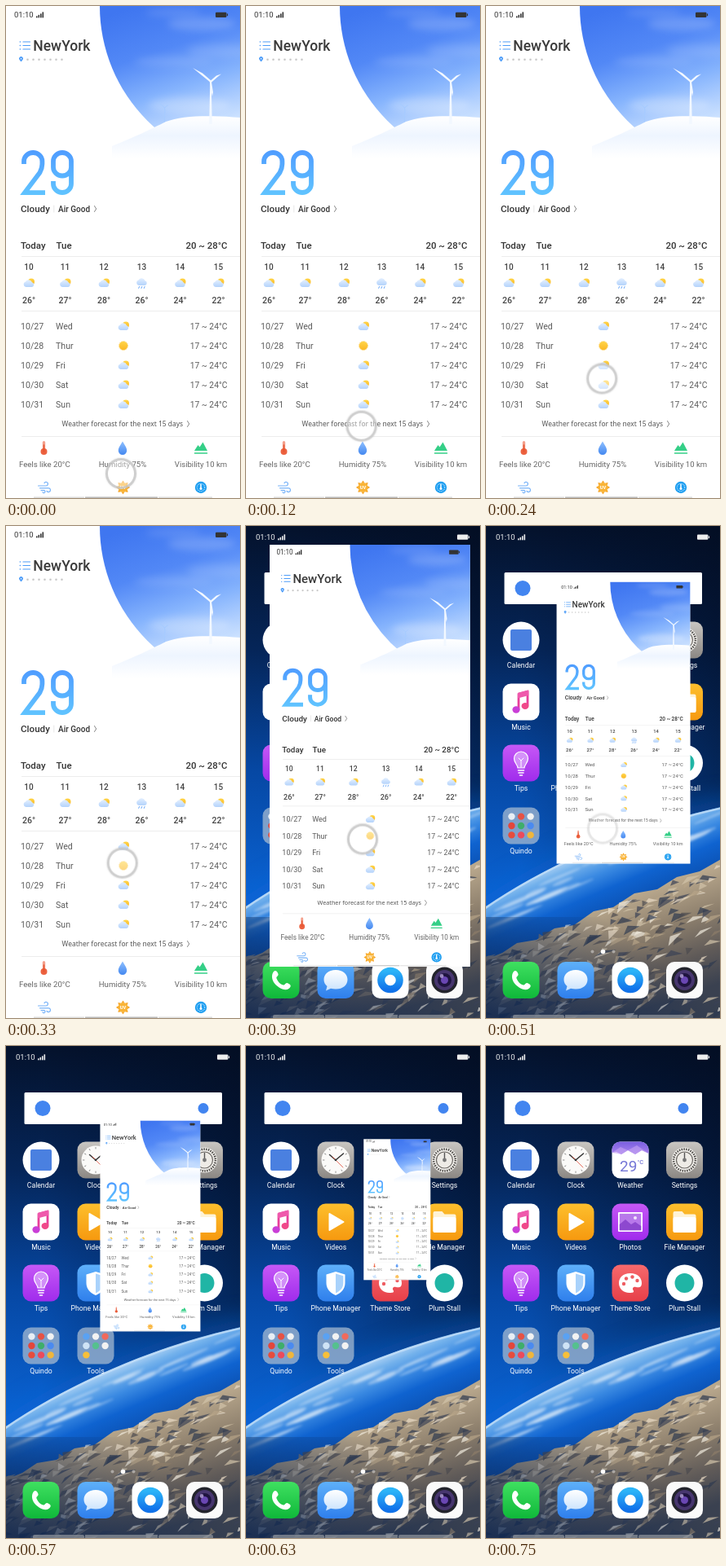
An HTML page for the animation above (1.8 s loop, 287 by 604 pixels).

```html
<!DOCTYPE html>
<html lang="en">
<head>
<meta charset="utf-8">
<title>Closing the weather app</title>
<style>
html, body { margin: 0; width: 100%; height: 100%; overflow: hidden; background: #061736; }
svg { position: absolute; left: 0; top: 0; width: 287px; height: 604px; display: block; overflow: hidden; }
text { font-family: Roboto, sans-serif; }
#app { background: #fff; transform-origin: 202px 160px; }
#touch { position: absolute; left: -19.5px; top: -19.5px; width: 32px; height: 32px; border: 3.5px solid rgba(190,190,190,.75);
  border-radius: 50%; background: rgba(255,255,255,.42); box-shadow: 0 0 2px rgba(150,150,150,.4); }
</style>
</head>
<body>
<svg id="home" viewBox="0 0 287 604"></svg>
<svg id="app" viewBox="0 0 287 604"></svg>
<div id="touch"></div>
<script>
const $ = id => document.getElementById(id);
const text = (x, y, s, size, more = '') => `<text x="${x}" y="${y}" font-size="${size}" ${more}>${s}</text>`;
const path = (d, more = '') => `<path d="${d}" ${more}/>`;
const rect = (x, y, w, h, fill, r = 0, more = '') => `<rect x="${x}" y="${y}" width="${w}" height="${h}" rx="${r}" fill="${fill}" ${more}/>`;
const dot = (x, y, r, fill, more = '') => `<circle cx="${x}" cy="${y}" r="${r}" fill="${fill}" ${more}/>`;
const at = (x, y, body) => `<g transform="translate(${x} ${y})">${body}</g>`;
const line = (d, color, w, more = '') => path(d, `fill="none" stroke="${color}" stroke-width="${w}" stroke-linecap="round" stroke-linejoin="round" ${more}`);
const stops = list => list.map(([o, c, a = 1]) => `<stop offset="${o}" stop-color="${c}" stop-opacity="${a}"/>`).join('');
const fade = (id, ...list) => `<linearGradient id="${id}" x2="0" y2="1">${stops(list)}</linearGradient>`;
const ramp = (id, x1, y1, x2, y2, ...list) =>
  `<linearGradient id="${id}" gradientUnits="userSpaceOnUse" x1="${x1}" y1="${y1}" x2="${x2}" y2="${y2}">${stops(list)}</linearGradient>`;
const mid = 'text-anchor="middle"', end = 'text-anchor="end"', bold = 'font-weight="500"';

function statusBar(x, y, color) {
  const bars = [2, 3.5, 5, 7].map((h, i) => rect(x + 27 + i * 2.5, y - h, 1.6, h, color)).join('');
  return text(x, y, '01:10', 9.5, `fill="${color}"`) + bars +
    rect(x + 247, y - 6.7, 13.4, 6.2, color, 1) + rect(x + 260.9, y - 5, 1.2, 2.8, color);
}

// ---------- weather app ----------
const cloud = 'M-3.6 5A3.4 3.4 0 0 1 -4 -1.6A4.4 4.4 0 0 1 4 -.8A3 3 0 0 1 4 5Z';
const skyIcon = {
  cloudy: dot(3, -1.4, 4, 'url(#sunny)') + path(cloud, 'fill="url(#cloud)"'),
  rain: path(cloud, 'fill="url(#cloud)" transform="translate(0 -2)"') + line('M-3 4.5l-.8 2M.3 4.5l-.8 2M3.6 4.5l-.8 2', '#6aa8f8', 1),
  sun: dot(0, 0, 5.2, 'url(#sunny)') + dot(0, 0, 5.5, 'none', 'stroke="#fdc53a" stroke-width=".8" stroke-dasharray="1.2 1"')
};
const chevron = (x, y) => line(`M${x} ${y - 3.5}l2.2 3.5l-2.2 3.5`, '#666', .8);

function turbine(x, y, k, base, color) {
  return path(`M${x - .7 * k} ${y}h${1.4 * k}L${x + 1.8 * k} ${base}h${-3.6 * k}Z`, `fill="${color}"`) +
    at(x, y, `<g transform="scale(${k})">` + path('M0 1L-22 -17L-10 -10.5L1 -1ZM-.5 -1L7 -7.5L13 -9.5L8 -5.5L.6 1ZM-1 0L1 0L3 13L2 18L.5 11Z', `fill="${color}"`) +
      dot(0, 0, 1.3, color) + '</g>');
}

function scenery() {
  return dot(314, 0, 199, 'url(#sky)') +
    `<g clip-path="url(#disc)"><g filter="url(#soft)" fill="#fff">
      <ellipse cx="240" cy="22" rx="42" ry="8" opacity=".18"/><ellipse cx="205" cy="8" rx="34" ry="5" opacity=".12"/>
      <ellipse cx="205" cy="68" rx="48" ry="6" opacity=".12"/><ellipse cx="262" cy="55" rx="40" ry="8" opacity=".12"/>
      <ellipse cx="225" cy="122" rx="50" ry="10" opacity=".25"/></g></g>` +
    turbine(194.5, 125, .42, 147, '#a6cbff') +
    path('M130 172C160 160 178 151 196 142C216 134 252 134 287 137V204H130Z', 'fill="url(#hill)"') +
    turbine(251, 93, 1, 145, '#f2f8ff');
}

function details() {
  const sunRays = Array.from({ length: 8 }, (_, i) => `<path d="M-2 -5.5L0 -8.6L2 -5.5Z" transform="rotate(${i * 45})" fill="#f6a62a"/>`).join('');
  return at(46.5, 543, rect(-1.7, -9, 3.4, 12, '#f4a08c', 1.7) + dot(0, 4, 4, '#ec6240') + line('M0 -4V4', '#e4532f', 1.5)) +
    at(143, 543, path('M0 -8.5C3 -3.5 5.2 -.5 5.2 2.8A5.2 5.2 0 0 1 -5.2 2.8C-5.2 -.5 -3 -3.5 0 -8.5Z', 'fill="url(#drop)"')) +
    at(239, 543, path('M-8 3L-3.5 -4L-1.5 -1.5L2.5 -7.5L8 3Z', 'fill="#35cf87"') + line('M-7.5 6H7.5', '#35cf87', 1.6)) +
    at(47, 591, line('M-7.5 -2H2A2.3 2.3 0 1 0 0 -5.2M-5.5 .8H5A2.4 2.4 0 1 1 3 4.4M-4 3.6H-.5A1.6 1.6 0 1 1 -2 6', '#77b2f8', 1.2)) +
    at(143.5, 591, sunRays + dot(0, 0, 5.9, '#f9b437') + text(0, 2.1, 'UV', 5.8, `fill="#fff" font-weight="700" ${mid}`)) +
    at(239, 591, dot(0, 0, 7.2, '#1c9df0') + dot(0, 0, 4.7, 'none', 'stroke="#bfe4ff" stroke-width="1.2" stroke-dasharray="1 1"') + line('M0 1L0 -3.5', '#fff', 1.5) + dot(0, 1.5, 1.5, '#fff'));
}

function drawApp() {
  const hours = [['10', 28, '26°'], ['11', 72.5, '27°'], ['12', 120, '28°'], ['13', 166.5, '26°'], ['14', 213.5, '24°'], ['15', 260.5, '22°']]
    .map(([h, x, deg]) => text(x, 324, h, 10, `fill="#444" ${bold} ${mid}`) +
      at(x, 340, skyIcon[h === '13' ? 'rain' : 'cloudy']) + text(x, 365, deg, 10.5, `fill="#444" ${bold} ${mid}`)).join('');
  const days = ['Wed', 'Thur', 'Fri', 'Sat', 'Sun'].map((day, i) => {
    const y = 393 + i * 24;
    return text(18, y + 4, `10/${27 + i}`, 10.6) + text(61, y + 4, day, 10.6) +
      at(144, y, skyIcon[day === 'Thur' ? 'sun' : 'cloudy']) + text(271.5, y + 4, '17 ~ 24°C', 10.3, end);
  }).join('');
  const rules = [307.5, 374.5, 528.5].map(y => rect(19, y - .5, 268, 1, '#ededed')).join('');
  const pages = Array.from({ length: 7 }, (_, i) => dot(26.5 + i * 7, 65.7, 1.3, '#c9c9c9')).join('');

  $('app').innerHTML = `<defs>
    ${ramp('sky', 160, 0, 215, 165, [0, '#3f76f0'], [.35, '#5288f6'], [.65, '#86b4fd'], [1, '#d3e6ff'])}
    ${fade('hill', [0, '#fff'], [.35, '#eef5ff'], [.75, '#fff'], [1, '#fff'])}
    ${fade('cloud', [0, '#e3efff'], [1, '#b4d3fb'])}
    ${fade('sunny', [0, '#ffd447'], [1, '#fbb827'])}
    ${fade('drop', [0, '#8fc0ff'], [1, '#4488f0'])}
    ${ramp('big', 0, 177, 0, 232, [0, '#4f9cff'], [1, '#60c4ff'])}
    <clipPath id="disc"><circle cx="314" cy="0" r="199"/></clipPath>
    <filter id="soft" x="-50%" y="-200%" width="200%" height="500%"><feGaussianBlur stdDeviation="5"/></filter></defs>` +
    scenery() + statusBar(10, 14.4, '#333') +
    line('M21 44H29.5M21 48.5H29.5M21 53H29.5', '#4c9cf8', 1.2) + line('M17.3 44h.1M17.3 48.5h.1M17.3 53h.1', '#4c9cf8', 1.5) +
    text(33.3, 54.5, 'NewYork', 17.5, `fill="#3a3a3a" ${bold}`) +
    path('M18.5 68.6L16.5 66A2.5 2.5 0 1 1 20.5 66Z', 'fill="#4c9cf8"') + dot(18.5, 64.8, .8, '#fff') + pages +
    `<g role="img" aria-label="29" fill="none" stroke="url(#big)" stroke-width="5.8">` +
    path('M22 194V190.5A11.2 10.5 0 0 1 44.4 190.5V194Q44.4 199 41.5 204.5L23 229.1H48') +
    path('M80 190.5A11 10.5 0 0 0 58 190.5V198A11 10.5 0 0 0 80 198M80 190.5V218.5A11 10.5 0 0 1 58 218.5V215') + '</g>' +
    text(18, 253, 'Cloudy', 11.6, `fill="#333" ${bold}`) + rect(58.5, 244.5, .7, 9, '#ddd') +
    text(64, 253, 'Air Good', 10, `fill="#333" ${bold}`) + chevron(108.5, 249) +
    `<g fill="#333" ${bold}>` + text(18, 298, 'Today', 11.5) + text(61.5, 298, 'Tue', 11.5) + text(271.5, 298, '20 ~ 28°C', 11.4, end) + '</g>' +
    rules + hours + `<g fill="#5c5c5c">${days}</g>` +
    text(68.5, 516, 'Weather forecast for the next 15 days', 8.45, 'fill="#555" style="font-family:\'Noto Sans\',sans-serif"') + chevron(222.5, 513) +
    `<g fill="#666" ${mid}>` + text(47.3, 565.7, 'Feels like 20°C', 9.65) + text(143, 565.7, 'Humidity 75%', 9.6) + text(239, 565.7, 'Visibility 10 km', 9.55) + '</g>' +
    details() + rect(34, 602.5, 62, 1.5, '#ddd') + rect(97, 602.5, 89, 1.5, '#bbb') + rect(187, 602.5, 66, 1.5, '#ddd');
}

// ---------- home screen ----------
function wallpaper() {
  let seed = 11;
  const rnd = () => (seed = seed * 16807 % 2147483647) / 2147483647;
  const tones = ['#e9dcc6', '#2f3a50', '#b7a488', '#4c4a4e', '#d2c3aa', '#3b4255', '#8d7d69', '#f0e9dd'];
  const ridgeTop = x => 531 - x * .41;
  let rocks = '', wisps = '';
  for (let i = 0; i < 320; i++) {
    const x = rnd() * 300 - 8, top = ridgeTop(x), y = top + rnd() ** 1.2 * (608 - top), w = 4 + rnd() * 10, h = 1 + rnd() * 3.5;
    rocks += at(x, y, path(`M${-w} ${h}L${-w * .2} ${-h}L${w * .4} ${-h * .2}L${w} ${h * .6}Z`,
      `fill="${tones[i % 8]}" opacity=".7" transform="rotate(${-42 + rnd() * 36})"`));
  }
  for (let i = 0; i < 26; i++) {
    const x = rnd() * 300, y = 468 - x * .54 + x * x * .00036 + 8 + rnd() * 24;
    wisps += `<ellipse rx="${12 + rnd() * 22}" ry="${1 + rnd() * 2.2}" fill="#e6f1fb" opacity=".4" transform="translate(${x} ${y}) rotate(-23)"/>`;
  }
  const limb = 'M-10 474C60 424 170 370 297 343';
  return rect(0, 0, 287, 604, 'url(#space)') + rect(0, 0, 287, 604, 'url(#shade)') +
    line(limb, '#0c66d8', 22, 'filter="url(#glow)" opacity=".5"') +
    path(limb + 'V610H-10Z', 'fill="url(#air)"') +
    line('M-10 475.5C60 425.5 170 371.5 297 344.5', '#c4dff8', 2.5, 'filter="url(#fine)" opacity=".8"') +
    `<g filter="url(#haze)">${wisps}</g>` +
    `<g filter="url(#fine)">${path('M-10 536L20 524L38 512L62 508L84 494L108 490L132 473L156 468L182 451L210 446L234 431L262 424L297 404V610H-10Z', 'fill="url(#land)"')}${rocks}</g>` +
    rect(0, 480, 287, 124, 'url(#dusk)');
}

const tile = (fill, body = '') => rect(-22.5, -22.5, 45, 45, fill, 10) + body;
const disc = body => dot(0, 0, 22.5, '#fff') + body;
const spokes = (n, d, color, w) => Array.from({ length: n }, (_, i) => line(d, color, w, `transform="rotate(${i * 360 / n})"`)).join('');
const folder = colors => tile('rgba(166,186,208,.75)', colors.map((c, i) => dot(i % 3 * 11.6 - 11.6, (i / 3 | 0) * 11.4 - 11.4, 4.2, c)).join(''));

const icons = {
  Calendar: disc(rect(-13, -13, 26, 26, '#4a80e0', 2)),
  Clock: tile('url(#steel)', dot(0, 0, 17.5, '#fbfaf8') + spokes(12, 'M0 -15.5V-14', '#777', .8) +
    line('M0 0L-7.5 -6.5M0 0L9.5 -8', '#333', 1.5) + line('M-4 -4L9 9', '#e0513a', .8) + dot(0, 0, 1.3, '#333')),
  Weather: tile('#fff', path('M-22.5 -9V-12.5A10 10 0 0 1 -12.5 -22.5H12.5A10 10 0 0 1 22.5 -12.5V-8L14 -12L6 -7L-3 -12L-11 -7L-17 -10Z', 'fill="url(#violet)"') +
    path('M-22.5 -9L-12 -16L-3 -12L8 -18L22.5 -8L14 -12L6 -7L-3 -12L-11 -7Z', 'fill="#c7a5f4" opacity=".6"') +
    text(-13, 14, '29', 19, 'fill="#7476d6"') + text(8.5, 5, '°C', 7.5, `fill="#7476d6" ${bold}`)),
  Settings: tile('url(#steel)', dot(0, 0, 15.5, '#f2f0ec') + dot(0, 0, 13.4, 'none', 'stroke="#4b4845" stroke-width="2.6" stroke-dasharray="1.5 1.3"') +
    dot(0, 0, 10, '#eeebe6', 'stroke="#6b6763" stroke-width="1.2"') + line('M0 0V-8.5', '#555', 1.4) + dot(0, 0, 2.4, '#777')),
  Music: tile('#fff', line('M-3 9V-10L8 -13V4', '#e83f9b', 2.8) + path('M-4 -11L9.3 -14.5V-8L-4 -4.5Z', 'fill="#ef59ac"') +
    '<ellipse cx="-6" cy="9.5" rx="4.6" ry="4.2" fill="#c93fd6"/><ellipse cx="5" cy="5" rx="4.5" ry="4" fill="#f0498a"/>'),
  Videos: tile('url(#amber)', path('M-7.5 -10L9.5 0L-7.5 10Z', 'fill="#fff" stroke="#fff" stroke-width="2" stroke-linejoin="round"')),
  Photos: tile('url(#purple)', rect(-15, -12, 30, 24, '#fff', 1) + rect(-13.2, -10.2, 26.4, 20.4, '#b878ea') +
    path('M-13.2 10.2V3L-6 -3L1 3L6 0L13.2 5V10.2Z', 'fill="#8d48cf"') + dot(6, -5, 2, '#f4e6ff')),
  'File Manager': tile('url(#amber)', path('M-14 11V-11Q-14 -13 -12 -13H-3L0 -9.5H12Q14 -9.5 14 -7.5V11Q14 13 12 13H-12Q-14 13 -14 11Z', 'fill="#fff3d6"') + rect(-14, -6, 28, 19, '#fff', 2)),
  Tips: tile('url(#purple)', path('M-4 6C-4 2 -8.5 0 -8.5 -5.5A8.5 8.5 0 0 1 8.5 -5.5C8.5 0 4 2 4 6Z', 'fill="#efd9ff" fill-opacity=".5" stroke="#fff" stroke-width="1.2"') +
    line('M0 5V-3L-3 -6M0 -3L3 -6', '#fff', 1) + line('M-3.5 9H3.5M-3 12H3M-1.5 15H1.5', '#fff', 1.6)),
  'Phone Manager': tile('url(#blue)', path('M0 -14L11.5 -10.5V0C11.5 8 6 12.5 0 15C-6 12.5 -11.5 8 -11.5 0V-10.5Z', 'fill="#fff"') + path('M0 -11.5L9.3 -8.7V0C9.3 6.5 5 10 0 12.3Z', 'fill="#a9d2fb"')),
  'Theme Store': tile('url(#red)', path('M0 -12C9 -12 14 -6.5 14 0C14 5 11 6 7 5C3 4 2 7 4 9.5C5 12 1 12 -1 12C-9 12 -14 6.5 -14 0C-14 -6.5 -9 -12 0 -12Z', 'fill="#fff"') +
    dot(-8, 1, 2.2, '#ee5d62') + dot(-5, -5.5, 2.2, '#ee5d62') + dot(2.5, -7.5, 2.2, '#ee5d62') + dot(8.5, -3, 2.2, '#ee5d62')),
  'Plum Stall': disc(dot(0, 0, 12, '#20b5a5')),
  Quindo: folder(['#e8eef5', '#e65244', '#f2f2f2', '#e4463c', '#3fae6a', '#4a8af0', '#e64c3c', '#eb4a5c', '#f0b63c']),
  Tools: folder(['#5aa2f2', '#f2f2f2', '#f06a5c', '#cfe3f5', '#55c08e', '#f2f2f2', '#f6bf3a'])
};
const dock = [
  tile('url(#green)', path('M-10 -9C-8 -13 -5 -12 -3.5 -7.5C-2.8 -5 -6.5 -4.5 -5.5 -2C-4 2 -1 5 2.5 6C5 6.5 5 3 7.5 3.5C12.5 5 13 8 9.5 10.5C4 14 -4 9 -8 4C-11 0 -12 -5 -10 -9Z', 'fill="#fff"')),
  tile('url(#blue)', path('M0 -12.5C9 -12.5 14.5 -7 14.5 -.8C14.5 6 9 11 0 11C-2 11 -4 10.8 -6 10.2L-12 13L-10.5 7.5C-13 5.5 -14.5 2.5 -14.5 -.8C-14.5 -7 -9 -12.5 0 -12.5Z', 'fill="url(#bubble)"')),
  tile('#fff', dot(0, 0, 11.3, '#fff', 'stroke="url(#ring)" stroke-width="9"')),
  tile('#fafafa', dot(0, 0, 16, '#23242c') + dot(0, 0, 12.5, '#47366f') + dot(0, 0, 8.5, '#1f1440') + dot(0, 0, 4.5, '#6a47b4') + dot(-3.5, -5, 2.4, '#cfb9f2', 'opacity=".7"'))
];

function drawHome() {
  const cols = [43, 110, 177, 243.5], rows = [140, 216, 291, 368];
  const apps = Object.entries(icons).map(([name, art], i) => {
    const x = cols[i % 4], y = rows[i / 4 | 0];
    return at(x, y, art) + text(x, y + 34, name, 8.7, `fill="#fff" ${mid}`);
  }).join('');
  const blur = (id, sd) => `<filter id="${id}" x="-20%" y="-40%" width="140%" height="180%"><feGaussianBlur stdDeviation="${sd}"/></filter>`;

  $('home').innerHTML = `<defs>
    ${fade('space', [0, '#04122c'], [.25, '#052558'], [.5, '#0648a4'], [.75, '#0a62d2'], [1, '#0a62d2'])}
    <linearGradient id="shade">${stops([[.15, '#020a1c', 0], [1, '#020a1c', .55]])}</linearGradient>
    ${ramp('air', 100, 411, 142, 509, [0, '#a5cdf3'], [.1, '#74b2ec'], [.28, '#3b8ae2'], [.48, '#0f63d0'], [.75, '#0b52b4'], [1, '#0b3c80'])}
    ${ramp('land', 130, 470, 175, 600, [0, '#b9a88d'], [.35, '#8f816e'], [.7, '#5f5a58'], [1, '#3a4150'])}
    ${ramp('dusk', 170, 500, 70, 640, [0, '#0a2450', 0], [1, '#0a2450', .8])}
    ${fade('steel', [0, '#c9c6c2'], [1, '#8b8783'])}
    ${fade('violet', [0, '#7a5fe0'], [1, '#a983ee'])}
    ${fade('amber', [0, '#fdbf2d'], [1, '#f6990f'])}
    ${fade('purple', [0, '#c658f6'], [1, '#a02cec'])}
    ${fade('blue', [0, '#5eb0fa'], [1, '#2f7fec'])}
    ${fade('bubble', [0, '#fff'], [1, '#c9e2fd'])}
    ${fade('red', [0, '#f7696c'], [1, '#e63f49'])}
    ${fade('green', [0, '#3fe060'], [1, '#0fb83a'])}
    ${fade('ring', [0, '#2cb4f8'], [1, '#1173ea'])}
    ${blur('glow', 14)}${blur('haze', 1.8)}${blur('fine', .6)}</defs>` +
    wallpaper() + statusBar(12, 17.3, '#eee') +
    rect(22.5, 57, 242.5, 39, '#fff', 1.5) + dot(45, 76.5, 9.5, '#4285f0') + dot(242, 76.5, 6.5, '#4285f0') +
    apps + dot(130.5, 522.5, 2, '#fff', 'opacity=".4"') + dot(143.5, 522.5, 2.8, '#fff') + dot(156.5, 522.5, 2, '#fff', 'opacity=".4"') +
    dock.map((art, i) => at(cols[i], 557.5, art)).join('') +
    rect(33, 600, 63, 6, '#8b9098', 2, 'opacity=".75"') + rect(97, 600, 89, 6, '#8b9098', 0, 'opacity=".75"') + rect(187, 600, 67, 6, '#8b9098', 2, 'opacity=".75"');
}

// ---------- motion ----------
const loop = 1800;
const play = (el, frames) => el.animate(
  frames.map(([ms, style, easing = 'step-end']) => ({ ...style, offset: ms / loop, easing })),
  { duration: loop, iterations: Infinity });
const finger = (x, y, opacity = 1) => ({ transform: `translate(${x}px, ${y}px)`, opacity });

drawHome();
drawApp();
play($('app'), [
  [0, { transform: 'scale(1)' }],
  [330, { transform: 'scale(1)' }, 'steps(14)'],
  [750, { transform: 'scale(0)' }],
  [loop, { transform: 'scale(0)' }]
]);
play($('touch'), [
  [0, finger(141, 574), 'steps(13)'],
  [390, finger(143, 384.5)],
  [420, finger(143, 377)],
  [450, finger(143, 373), 'steps(4)'],
  [570, finger(143, 370, 0)],
  [loop, finger(143, 370, 0)]
]);
</script>
</body>
</html>
```
